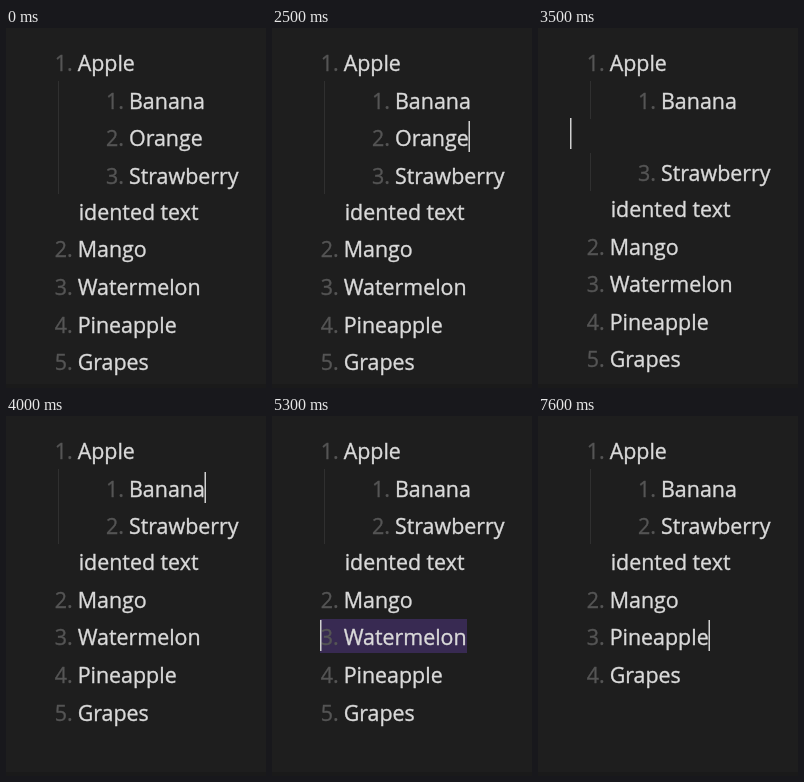
Recreate the animation shown at these times as an HTML page with a canvas. Size 260 px wide and 360 px high, loop 8 s.

```html
<!DOCTYPE html>
<html lang="en">
<head>
<meta charset="utf-8">
<title>Deleting list items</title>
<style>
  html, body { margin: 0; height: 100%; overflow: hidden; background: #1e1e1e; }
  canvas { display: block; }
</style>
</head>
<body>
<canvas id="stage" width="260" height="360"></canvas>
<script>
const ctx = document.getElementById('stage').getContext('2d');
const LOOP = 8000, CARET_ON = 550;
const MARGIN = 32, LIST_X = 48.7, INDENT = 51.3, NUMBER_WIDTH = 23;
const FIRST_BASELINE = 43.1;
const ITEM_HEIGHT = 37.55, TEXT_HEIGHT = 36.15, BLANK_HEIGHT = 34.6;

// Tabs mark the nested items; the line without a number starts with a space.
const lines = ['Apple', '\tBanana', '\tOrange', '\tStrawberry', ' idented text',
  'Mango', 'Watermelon', 'Pineapple', 'Grapes'];

// Each edit clicks behind an item, selects its line, empties it and removes it.
const edits = [
  { item: 'Orange', click: 2500, select: 2550, empty: 3500, remove: 3950 },
  { item: 'Watermelon', click: 5100, select: 5250, empty: 6000, remove: 6600 },
  { item: 'Pineapple', click: 7600 }
];

function layout(t) {
  const rows = [], counters = [0, 0];
  let baseline = FIRST_BASELINE;
  for (const line of lines) {
    const name = line.trim();
    const edit = edits.find(e => e.item === name) || {};
    if (t >= edit.remove) continue;

    const blank = t >= edit.empty;
    const plain = line[0] === ' ';
    const depth = line[0] === '\t' ? 1 : 0;
    if (rows.length) baseline += blank ? BLANK_HEIGHT : plain ? TEXT_HEIGHT : ITEM_HEIGHT;

    const left = LIST_X + depth * INDENT;
    const textX = left + NUMBER_WIDTH + (plain ? 1 : 0);
    rows.push({
      name, depth, blank, left, textX,
      y: Math.round(baseline),
      number: plain ? '' : ++counters[depth] + '.',
      end: Math.round(textX + ctx.measureText(name).width)
    });
  }
  return rows;
}

function box(color, x, y, w, h) {
  ctx.fillStyle = color;
  ctx.fillRect(x, y, w, h);
}

function label(color, text, x, y) {
  ctx.fillStyle = ctx.strokeStyle = color;
  ctx.fillText(text, x, y);
  ctx.strokeText(text, x, y);
}

function currentStep(t) {
  const edit = edits.findLast(e => t >= e.click);
  if (!edit) return null;
  const kind = ['remove', 'empty', 'select', 'click'].find(k => t >= edit[k]);
  return { item: edit.item, kind, age: t - edit[kind] };
}

// After a removal the caret jumps to the end of the line above.
function caretRow(rows, { item, kind }) {
  const above = lines[lines.findIndex(l => l.trim() === item) - 1].trim();
  return rows.find(r => r.name === (kind === 'remove' ? above : item));
}

function drawSelection({ depth, left, end, y }) {
  const start = Math.floor(left);
  if (depth) box('#382a52', MARGIN, y - 26, INDENT, 34);
  box('#382a52', start, y - 26, end - start, 34);
}

function drawRow({ name, depth, blank, left, textX, number, y }) {
  if (blank) return;
  if (depth) box('#303030', 52, y - 28, 1, 38);
  label('#555', number, left, y);
  label('#dadada', name, textX, y);
}

function drawCaret({ depth, blank, left, end, y }, kind) {
  const lineStart = depth || blank ? MARGIN : Math.floor(left);
  const x = kind === 'select' || kind === 'empty' ? lineStart : end - 0.5;
  box('#d0d0d0', x, y - 25, 1.5, 31);
}

function draw(t) {
  const rows = layout(t), step = currentStep(t);
  const active = step && caretRow(rows, step);
  box('#1e1e1e', 0, 0, 260, 360);
  box('#1a1a1a', 0, 356, 260, 4);
  if (step && step.kind === 'select') drawSelection(active);
  rows.forEach(drawRow);
  if (step && step.age < CARET_ON) drawCaret(active, step.kind);
}

ctx.font = '21.4px "Open Sans", "Noto Sans", sans-serif';
ctx.lineWidth = 0.35;

function frame() {
  draw(performance.now() % LOOP);
  requestAnimationFrame(frame);
}
frame();
</script>
</body>
</html>
```
